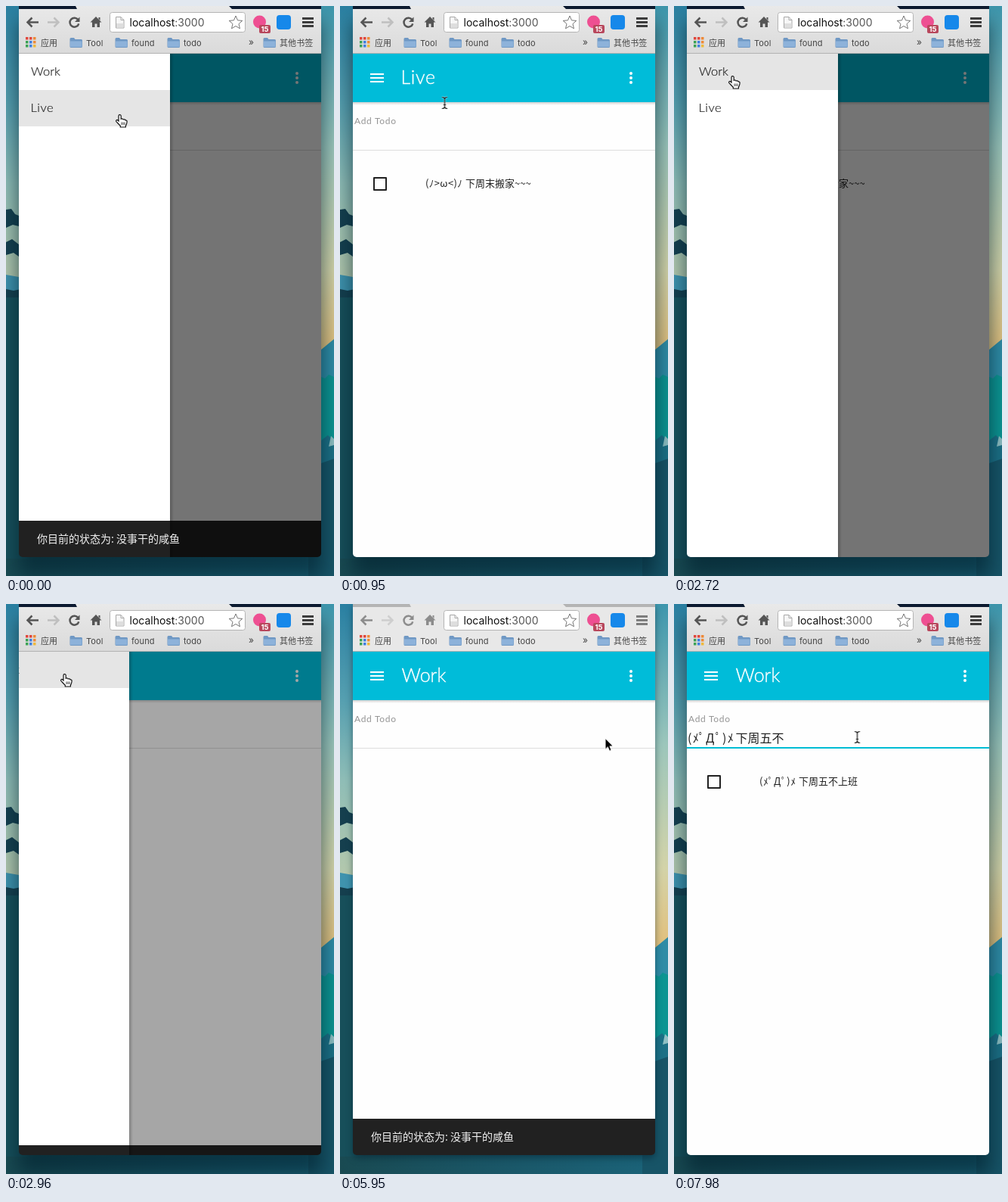
An HTML page for the animation above (8 s loop, 434 by 753 pixels).

```html
<!DOCTYPE html>
<html lang="zh">
<head>
<meta charset="utf-8">
<title>Todo drawer</title>
<style>
html, body { margin: 0; width: 100%; height: 100%; overflow: hidden; background: #17505c; }
svg { display: block; width: 434px; height: 753px; }
text { font-family: "Noto Sans CJK SC", "Noto Sans CJK", "Noto Sans CJK JP", sans-serif; white-space: pre; }
.ui { font: 11px Inter, "Noto Sans CJK SC", "Noto Sans CJK", sans-serif; fill: #444; letter-spacing: .1px; }
.url { font: 14px Inter, sans-serif; fill: #111; }
.geo { font-family: Lato, sans-serif; font-weight: 300; }
.title { font-size: 25px; fill: #fff; stroke: #fff; stroke-width: .4px; }
.menu { font-size: 16.5px; fill: #222; stroke: #222; stroke-width: .2px; }
.item { font-size: 13px; font-weight: 300; fill: #212121; }
.field { font-size: 16px; font-weight: 300; fill: #212121; }

/* Every part holds its pose between ticks; 1% is 80 ms. */
.a { animation: 8s step-end infinite; }
#active, #shadeOn { animation-name: active; }
#shadeOff { animation-name: inactive; }
#nav { animation-name: nav; }
#workTitle { animation-name: work; }
#livePage { animation-name: live; }
#scrim { animation-name: scrim; }
#drawer { animation-name: drawer; }
#hoverLive { animation-name: hoverLive; }
#hoverWork { animation-name: hoverWork; }
#snack { animation-name: snack; }
#line { animation-name: line; transform-origin: 217px 190px; }
#typed { animation-name: typed; }
#tail { animation-name: tail; }
#added { animation-name: added; }
#hand { animation-name: hand; }
#arrow { animation-name: arrow; }
#beam { animation-name: beam; }

@keyframes active { 0% { opacity: 1 } 44.375% { opacity: 0 } 77.375% { opacity: 1 } }
@keyframes inactive { 0% { opacity: 0 } 44.375% { opacity: 1 } 77.375% { opacity: 0 } }
@keyframes nav { 0% { opacity: 1 } 44.375% { opacity: .62 } 77.375% { opacity: 1 } }
@keyframes work { 0% { opacity: 1 } 1.5% { opacity: 0 } 37% { opacity: 1 } }
@keyframes live { 0% { opacity: 0 } 1.5% { opacity: 1 } 37% { opacity: 0 } }
@keyframes scrim {
  0% { opacity: .54 } 1.5% { opacity: .35 } 3% { opacity: .07 } 4.375% { opacity: .01 } 5.875% { opacity: 0 }
  28.125% { opacity: .188 } 29.5% { opacity: .48 } 31% { opacity: .53 } 32.5% { opacity: .54 }
  37% { opacity: .35 } 38.375% { opacity: .07 } 39.875% { opacity: 0 }
}
@keyframes drawer {
  0% { transform: none } 1.5% { transform: translateX(-54px) } 3% { transform: translateX(-168px) }
  4.375% { transform: translateX(-195px) } 5.875% { transform: translateX(-210px) }
  28.125% { transform: translateX(-146px) } 29.5% { transform: translateX(-30px) }
  31% { transform: translateX(-5px) } 32.5% { transform: none }
  37% { transform: translateX(-54px) } 38.375% { transform: translateX(-168px) } 39.875% { transform: translateX(-210px) }
}
@keyframes hoverLive { 0% { opacity: 1 } 4.375% { opacity: 0 } }
@keyframes hoverWork { 0% { opacity: 0 } 31% { opacity: 1 } 39.875% { opacity: 0 } }
@keyframes snack {
  0% { transform: none } 1.5% { transform: translateY(13px) } 3% { transform: translateY(41px) } 4.375% { transform: translateY(49px) }
  37% { transform: translateY(35px) } 38.375% { transform: translateY(7px) } 39.875% { transform: none }
  86.375% { transform: translateY(13px) } 87.875% { transform: translateY(42px) } 89.375% { transform: translateY(49px) }
}
@keyframes line {
  0% { transform: scaleX(0) } 80.375% { transform: scaleX(.27) } 81.875% { transform: scaleX(.84) }
  83.375% { transform: scaleX(.98) } 84.875% { transform: none }
}
@keyframes typed { 0% { opacity: 0 } 92.375% { opacity: 1 } }
@keyframes tail { 0% { opacity: 1 } 99.75% { opacity: 0 } }
@keyframes added { 0% { opacity: 0 } 98.375% { opacity: 1 } }
@keyframes hand {
  0% { transform: translate(145px, 143px) } 4.375% { transform: translate(-99px, 0) }
  16.25% { transform: translate(70px, 84px) } 17.625% { transform: translate(63px, 88px) }
  19.125% { transform: translate(61px, 90px) } 31% { transform: translate(66px, 91px) }
  34% { transform: translate(72px, 92px) } 44.375% { transform: translate(-99px, 0) }
}
@keyframes arrow {
  0% { transform: translate(-99px, 0) } 4.375% { transform: translate(230px, 202px) }
  5.875% { transform: translate(310px, 255px) } 7.375% { transform: translate(352px, 282px) }
  11.875% { transform: translate(-99px, 0) } 74.375% { transform: translate(351px, 177.5px) }
  75.875% { transform: translate(-99px, 0) }
}
@keyframes beam {
  0% { transform: translate(-99px, 0) } 11.875% { transform: translate(138.5px, 128px) }
  13.375% { transform: translate(109.5px, 95.5px) } 16.25% { transform: translate(-99px, 0) }
  75.875% { transform: translate(300px, 177px) } 77.375% { transform: translate(262px, 176px) }
  80.375% { transform: translate(242.5px, 176px) }
}
</style>
</head>
<body>
<svg viewBox="0 0 434 753" width="434" height="753">
  <defs>
    <linearGradient id="skyL" x2="0" y2="1">
      <stop offset="0" stop-color="#2a80a2"/><stop offset=".35" stop-color="#559fb0"/>
      <stop offset=".65" stop-color="#8fbdb6"/><stop offset="1" stop-color="#b4c8ac"/>
    </linearGradient>
    <linearGradient id="skyR" x2="0" y2="1">
      <stop offset="0" stop-color="#3d96ad"/><stop offset=".4" stop-color="#9cc6bb"/>
      <stop offset=".75" stop-color="#d3d3a8"/><stop offset="1" stop-color="#e4bd76"/>
    </linearGradient>
    <linearGradient id="ground">
      <stop offset="0" stop-color="#194a52"/><stop offset=".5" stop-color="#1a5768"/><stop offset="1" stop-color="#1b647a"/>
    </linearGradient>
    <linearGradient id="bar" x2="0" y2="1">
      <stop offset="0" stop-color="#e9e9e9"/><stop offset="1" stop-color="#dadada"/>
    </linearGradient>
    <linearGradient id="edge">
      <stop offset="0" stop-opacity=".22"/><stop offset="1" stop-opacity="0"/>
    </linearGradient>
    <linearGradient id="drop" x2="0" y2="1">
      <stop offset="0" stop-opacity=".18"/><stop offset="1" stop-opacity="0"/>
    </linearGradient>
    <clipPath id="win"><path d="M17 0H417V723a5 5 0 0 1-5 5H22a5 5 0 0 1-5-5z"/></clipPath>
    <g id="folder">
      <path d="M0 2a1.5 1.5 0 0 1 1.5-1.5h4l1.5 2h8A1.5 1.5 0 0 1 16.5 4v8a1.5 1.5 0 0 1-1.5 1.5h-13.5A1.5 1.5 0 0 1 0 12z" fill="#6f98c4"/>
      <path d="M.5 5h15.5v7.5h-15.5z" fill="#8db2da"/>
    </g>
    <path id="box" d="M45 227h16v16H45z" fill="none" stroke="#212121" stroke-width="2" stroke-linejoin="round"/>
    <path id="stem" d="M-3.5-7.5q3 0 3.5 2 .5-2 3.5-2M0-5.5v11M-3.5 7.5q3 0 3.5-2 .5 2 3.5 2M-1.5 2.5h3"/>
    <path id="tabs" d="M17 0H92L94 4H17zM295 0H417V4H299z"/>
  </defs>

  <!-- wallpaper -->
  <rect width="434" height="753" fill="url(#ground)"/>
  <rect width="40" height="360" fill="url(#skyL)"/>
  <path d="M0 355l17 3v20H0z" fill="#3f93ae"/>
  <path d="M0 269l7-1 5 7 5 2v14l-8-2-9 4zM0 312l8-4 9 7v16l-7-5-10 3zM0 374l10 2 10-2v16H0z" fill="#153f4e"/>
  <rect y="385" width="30" height="345" fill="#174f5a"/>
  <rect x="400" width="34" height="465" fill="url(#skyR)"/>
  <path d="M400 469l17-15 17-14v60h-34z" fill="#2f8ca6"/>
  <path d="M400 500l17-10 5 2 5-5 7 3v88l-8-6-9 4-17-3z" fill="#0c9592"/>
  <path d="M400 572l17 2 9-7 8 8v40l-34 5z" fill="#1c7086"/>
  <path d="M427 582l3-14 4 4v8z" fill="#8fc0c4"/>
  <path d="M400 618l17-14 17-6v155h-34z" fill="#175467"/>
  <rect class="a" id="shadeOn" x="15" y="20" width="404" height="734" rx="6" style="filter:blur(13px)" fill="#00202c" fill-opacity=".62"/>
  <rect class="a" id="shadeOff" x="17" y="2" width="400" height="730" rx="6" opacity="0" style="filter:blur(5px)" fill="#002030" fill-opacity=".5"/>

  <g clip-path="url(#win)">
    <!-- browser chrome -->
    <rect x="17" width="400" height="63" fill="#e8e8e8"/>
    <use href="#tabs" fill="#b4b4b4"/>
    <g class="a" id="active">
      <rect x="17" width="400" height="63" fill="url(#bar)"/>
      <use href="#tabs" fill="#0c1a30"/>
    </g>
    <path d="M17 62.5h400" stroke="#b2b2b2"/>
    <g class="a" id="nav" fill="none" stroke="#555" stroke-width="2.5">
      <path d="M43 21.5H29M34.5 15.5l-6 6 6 6"/>
      <path d="M55 21.5h14M63.5 15.5l6 6-6 6" stroke="#bfbfbf"/>
      <path d="M95.5 18.3a6 6 0 1 0 .8 5"/>
      <path d="M97.5 14.5v6.5h-6.5z" fill="#555" stroke="none"/>
      <path d="M119 14l7.5 7.5H124V28h-3.5v-4.5h-3V28H114v-6.5h-2.5zM122.5 15h2v4l-2-2z" fill="#555" stroke="none"/>
      <path d="M392 16.5h15M392 21.5h15M392 26.5h15" stroke="#3c3c3c" stroke-width="3"/>
    </g>
    <rect x="137.5" y="8.5" width="179" height="26" rx="3" fill="#fff" stroke="#b4b4b4"/>
    <path d="M145.5 14.5h6.5l4 4v10.5h-10.5zM152 14.5v4h4" fill="#f6f6f6" stroke="#a8a8a8"/>
    <path d="M146 23h9.5v5.5H146z" fill="#dedede"/>
    <text class="url" x="163.5" y="27">localhost<tspan fill="#555">:3000</tspan></text>
    <path d="M304 13l2.5 5.9 6.3.5-4.8 4.2 1.5 6.2-5.5-3.3-5.5 3.3 1.5-6.2-4.8-4.2 6.3-.5z" fill="#fff" stroke="#777"/>
    <circle cx="335.5" cy="21" r="8.5" fill="#ee4f92"/>
    <rect x="335" y="25" width="15" height="11" rx="2" fill="#b8475c"/>
    <text x="342.5" y="34" text-anchor="middle" style="font:bold 9.5px Inter,sans-serif" fill="#fff">15</text>
    <rect x="358" y="12" width="19" height="19" rx="4" fill="#1688ea"/>

    <path d="M26 41h3.5v3.5H26zM31 41h3.5v3.5H31z" fill="#e0483c"/>
    <path d="M36 41h3.5v3.5H36zM36 46h3.5v3.5H36z" fill="#ee8a38"/>
    <path d="M26 46h3.5v3.5H26zM26 51h3.5v3.5H26z" fill="#3da356"/>
    <path d="M31 46h3.5v3.5H31zM31 51h3.5v3.5H31z" fill="#4080e0"/>
    <path d="M36 51h3.5v3.5H36z" fill="#efb93c"/>
    <use href="#folder" x="84.5" y="41.5"/><use href="#folder" x="144.5" y="41.5"/>
    <use href="#folder" x="213.5" y="41.5"/><use href="#folder" x="340.5" y="41.5"/>
    <text class="ui" x="46" y="53">应用</text>
    <text class="ui" x="106" y="53">Tool</text>
    <text class="ui" x="166" y="53">found</text>
    <text class="ui" x="235" y="53">todo</text>
    <text class="ui" x="321" y="52" style="font-size:12px">»</text>
    <text class="ui" x="362" y="53">其他书签</text>

    <!-- page -->
    <rect x="17" y="63" width="400" height="665" fill="#fefefe"/>
    <rect x="17" y="127" width="400" height="4" fill="url(#drop)"/>
    <rect x="17" y="63" width="400" height="64" fill="#00bcd9"/>
    <path d="M40 90h18M40 95h18M40 100h18" stroke="#fff" stroke-width="2"/>
    <g fill="#fff"><circle cx="385" cy="89" r="2"/><circle cx="385" cy="95" r="2"/><circle cx="385" cy="101" r="2"/></g>
    <text class="a geo title" id="workTitle" x="81.5" y="103">Work</text>
    <text class="geo" x="19" y="156" font-size="12" letter-spacing=".7" fill="#949494" style="font-weight:400">Add Todo</text>
    <path d="M17 190.5h400" stroke="#dedede"/>
    <g class="a" id="livePage" opacity="0">
      <text class="geo title" x="80.5" y="103" letter-spacing=".7">Live</text>
      <use href="#box"/>
      <text class="item" x="113" y="239" letter-spacing=".4">(ﾉ&gt;ω&lt;)ﾉ</text>
      <text class="item" x="166" y="239">下周末搬家</text>
      <text class="item" x="231" y="239">~~~</text>
    </g>
    <rect class="a" id="line" x="17" y="189" width="400" height="2" fill="#00bcd4"/>
    <g class="a" id="typed" opacity="0">
      <text class="field" x="18" y="183" letter-spacing="1.3">(ﾒﾟДﾟ)ﾒ</text>
      <text class="field" x="81.5" y="183">下周五不</text>
      <text class="a field" id="tail" x="145.5" y="183">上班</text>
    </g>
    <g class="a" id="added" opacity="0">
      <use href="#box"/>
      <text class="item" x="113" y="239" letter-spacing=".8">(ﾒﾟДﾟ)ﾒ</text>
      <text class="item" x="165" y="239">下周五不上班</text>
    </g>

    <rect class="a" id="scrim" x="17" y="63" width="400" height="665"/>
    <g class="a" id="drawer">
      <rect x="217" y="63" width="5" height="665" fill="url(#edge)"/>
      <rect x="17" y="63" width="200" height="665" fill="#fff"/>
      <rect class="a" id="hoverWork" x="17" y="63" width="200" height="48" fill="#e5e5e5"/>
      <rect class="a" id="hoverLive" x="17" y="111" width="200" height="48" fill="#e5e5e5"/>
      <text class="geo menu" x="33" y="92">Work</text>
      <text class="geo menu" x="32.5" y="140" letter-spacing=".5">Live</text>
    </g>
    <g class="a" id="snack">
      <rect x="17" y="680" width="400" height="48" fill-opacity=".87"/>
      <text x="41" y="709" font-size="14" font-weight="300" fill="#f2f2f2">你目前的状态为: 没事干的咸鱼</text>
    </g>
  </g>

  <!-- pointers -->
  <g class="a" id="hand" stroke="#111">
    <path d="M4 9V2.3a1.6 1.6 0 0 1 3.2 0V6.3c1.2-.7 2.7-.3 3 .7 1.2-.6 2.5-.1 2.7.9 1.3-.3 2.3.4 2.2 1.7 0 3-.9 4-1.7 5.6V17H6.3V15.2C4.6 13.6 2.4 11.2.8 9.6 0 8 1.8 6.8 3 8z" fill="#fff" stroke-width="1.2"/>
    <path d="M8 10.5v3.5M10 10.5v3.5M12 10.5v3.5" stroke-width=".8"/>
  </g>
  <path class="a" id="arrow" d="M0 0V14.5l3.3-3.1 2.3 5.2 2.6-1.1-2.3-5.1h4.6z" stroke="#fff"/>
  <g class="a" id="beam" fill="none">
    <use href="#stem" stroke="#fff" stroke-width="2.6" stroke-opacity=".6"/>
    <use href="#stem" stroke="#111" stroke-width="1.2"/>
  </g>
</svg>
</body>
</html>
```
